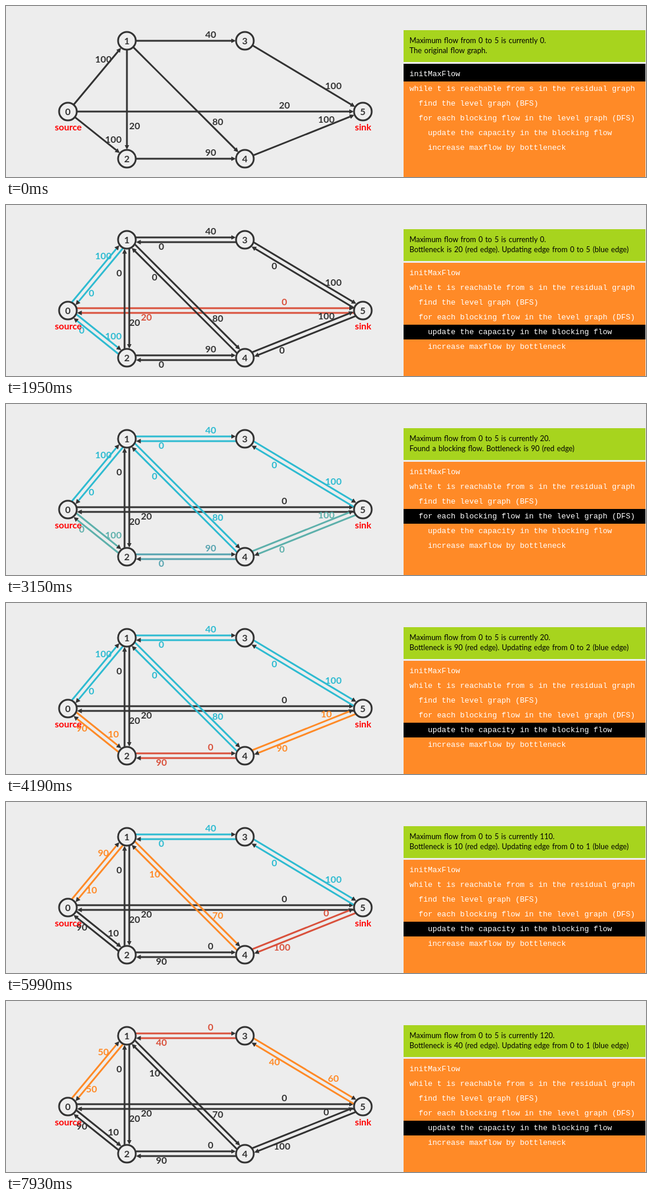
Animation, 1085 px wide and 290 px high, one loop 8000 ms. Source, as an HTML page:

```html
<!DOCTYPE html>
<html lang="en">
<head>
<meta charset="utf-8">
<title>Maximum flow</title>
<style>
html, body { margin: 0; width: 100%; height: 100%; overflow: hidden; background: #ededed; }
svg { display: block; width: 1085px; height: 290px; }
.graph text { font: bold 16px Lato, "Open Sans", sans-serif; text-anchor: middle; }
.edge line { stroke-width: 3; }
.node circle { fill: #eee; stroke: #333; stroke-width: 3; }
.node text { fill: #333; }
.graph .end { fill: #f00; font-size: 15.5px; }
.status { font: 12.5px Lato, "Open Sans", sans-serif; word-spacing: 1px; }
.code { font: 13px "Liberation Mono", monospace; fill: #fff; white-space: pre; }
</style>
</head>
<body>
<svg id="stage" viewBox="0 0 1085 290">
  <defs>
    <marker id="tip" markerUnits="userSpaceOnUse" markerWidth="8" markerHeight="8" refX="5" refY="4" orient="auto">
      <path d="M0 0L8 4L0 8Z" fill="#333"/>
    </marker>
  </defs>
  <g class="graph" id="graph"></g>
  <rect x="674" y="41" width="410" height="54" fill="#a7d41e"/>
  <text class="status" id="flow" x="684" y="63"></text>
  <text class="status" id="note" x="684" y="80"></text>
  <rect x="674" y="98" width="410" height="192" fill="#ff8a27"/>
  <rect id="bar" x="674" width="410"/>
  <g id="code"></g>
</svg>
<script>
const LOOP = 8000, EASE = 373;
const $ = id => document.getElementById(id);
const COLORS = { k: [51, 51, 51], b: [46, 187, 209], o: [255, 138, 39], r: [217, 81, 60] };
const NODES = [[105, 179], [205, 59], [205, 259], [405, 59], [405, 259], [605, 179]];

// from, to, capacity, forward label x y, backward label x y
const EDGES = [
  [0, 1, 100, 165, 86, 145, 149.5],
  [0, 2, 100, 182, 222.5, 128.5, 212],
  [0, 5, 20, 472, 164.5, 238, 190.5],
  [1, 2, 20, 218, 199.5, 192, 115.5],
  [1, 3, 40, 347, 44.5, 263.5, 70.5],
  [1, 4, 80, 359, 192.5, 252, 122.5],
  [2, 4, 90, 347, 244.5, 263.5, 270.5],
  [3, 5, 100, 555, 131.5, 455, 103],
  [4, 5, 100, 543, 188.5, 468, 246.5]
];

const CODE = [
  'initMaxFlow',
  'while t is reachable from s in the residual graph',
  '  find the level graph (BFS)',
  '  for each blocking flow in the level graph (DFS)',
  '    update the capacity in the blocking flow',
  '    increase maxflow by bottleneck'
];

// Moments at which the picture may change
const run = (from, n) => Array.from({ length: n }, (_, i) => from + i * 150);
const TICKS = [0, ...run(900, 8), 2400, ...run(2700, 6), 3890, 4190, 4490,
  ...run(4940, 3), 5690, 5990, 6440, ...run(6740, 3), 7180, 7480, 7930];

const steps = [];
let total = 0, colors = 'kkkkkkkkk', flows = EDGES.map(() => 0);

function step(time, line, note, next, level) {
  steps.push({ time, line, note, prev: colors, colors: next || colors, flows: [...flows],
    status: `Maximum flow from 0 to 5 is ${level ? '' : 'currently '}${total}.` });
  colors = next || colors;
}
const levels = (time, sink, next) =>
  step(time, 3, `Got the level graph (blue edges). Sink is level ${sink}.`, next, true);

// One augmenting path: find it, update its edges from the sink back, add to the total
function augment(start, amount, next, updates, added) {
  step(start, 4, `Found a blocking flow. Bottleneck is ${amount} (red edge)`, next);
  for (const [time, e] of updates) {
    flows[e] += amount;
    const [a, b] = EDGES[e];
    step(time, 5, `Bottleneck is ${amount} (red edge). Updating edge from ${a} to ${b} (blue edge)`);
  }
  total += amount;
  step(added, 6, `Maximum flow is increased by ${amount}.`);
}

step(0, 1, 'The original flow graph.');
step(769, 1, 'The residual graph.');
levels(1142, 1, 'bbbkkkkkk');
augment(1515, 20, 'bbrkkkkkk', [[1950, 2]], 2400);
levels(2634, 3, 'bbkkbbbbb');
augment(3007, 90, 'bokkbbrbo', [[3450, 8], [3890, 6], [4190, 1]], 4490);
augment(4840, 10, 'okkkbokbr', [[5240, 8], [5690, 5], [5990, 0]], 6440);
augment(6737, 40, 'okkkrkkok', [[7180, 7], [7480, 4], [7930, 0]], LOOP);

function make(tag, attrs, parent, text = '') {
  const el = document.createElementNS('http://www.w3.org/2000/svg', tag);
  set(el, attrs);
  el.textContent = text;
  return parent.appendChild(el);
}
function set(el, attrs) {
  for (const k in attrs) el.setAttribute(k, attrs[k]);
}

const graph = $('graph');
const arcs = [];
EDGES.forEach(([a, b, cap, fx, fy, bx, by], edge) => {
  const add = (from, to, x, y, back) => {
    const [x1, y1] = NODES[from], [x2, y2] = NODES[to];
    const len = Math.hypot(x2 - x1, y2 - y1);
    const g = make('g', { class: 'edge' }, graph);
    arcs.push({ edge, cap, x, y, back, g, x1, y1, x2, y2, ux: (x2 - x1) / len, uy: (y2 - y1) / len,
      line: make('line', { 'marker-end': 'url(#tip)' }, g) });
  };
  add(a, b, fx, fy, false);
  add(b, a, bx, by, true);
});
for (const arc of arcs) arc.label = make('text', {}, graph);
NODES.forEach(([x, y], i) => {
  const g = make('g', { class: 'node' }, graph);
  make('circle', { cx: x, cy: y, r: 15 }, g);
  make('text', { x, y: y + 5.5 }, g, i);
});
make('text', { class: 'end', x: 105.5, y: 210.5 }, graph, 'source');
make('text', { class: 'end', x: 605.5, y: 210.5 }, graph, 'sink');
CODE.forEach((s, i) => {
  const text = s.trimStart();
  make('text', { class: 'code', x: 684 + (s.length - text.length) * 7.8, y: 119 + 25 * i }, $('code'), text);
});

const ease = t => t < 0.5 ? 4 * t ** 3 : 1 - 4 * (1 - t) ** 3;
const progress = (now, start) => ease(Math.min(1, Math.max(0, (now - start) / EASE)));
const mix = (a, b, p) =>
  `rgb(${COLORS[a].map((v, i) => Math.round(v + (COLORS[b][i] - v) * p))})`;

function draw(now) {
  const s = steps.findLast(s => s.time <= now);
  const p = progress(now, s.time), split = progress(now, steps[1].time);
  for (const a of arcs) {
    const color = mix(s.prev[a.edge], s.colors[a.edge], p);
    const dx = a.uy * 4 * split, dy = -a.ux * 4 * split;
    const opacity = a.back ? split : 1;
    set(a.g, { opacity });
    set(a.line, {
      x1: a.x1 + a.ux * 15 + dx, y1: a.y1 + a.uy * 15 + dy,
      x2: a.x2 - a.ux * 18.5 + dx, y2: a.y2 - a.uy * 18.5 + dy, stroke: color
    });
    set(a.label, { x: a.x, y: a.y + 5.5 + (a.back ? 0 : 4 * (1 - split)), fill: color, opacity });
    const flow = s.flows[a.edge];
    a.label.textContent = a.back ? flow : a.cap - flow;
  }
  $('flow').textContent = s.status;
  $('note').textContent = s.note;
  set($('bar'), s.line === 1 ? { y: 98, height: 30 } : { y: 78 + 25 * s.line, height: 25 });
}

let origin, shown;
function frame(time) {
  origin ??= time;
  const t = (time - origin) % LOOP;
  const tick = TICKS.findLast(v => v <= t);
  if (tick !== shown) draw(shown = tick);
  requestAnimationFrame(frame);
}
draw(shown = 0);
requestAnimationFrame(frame);
</script>
</body>
</html>
```
